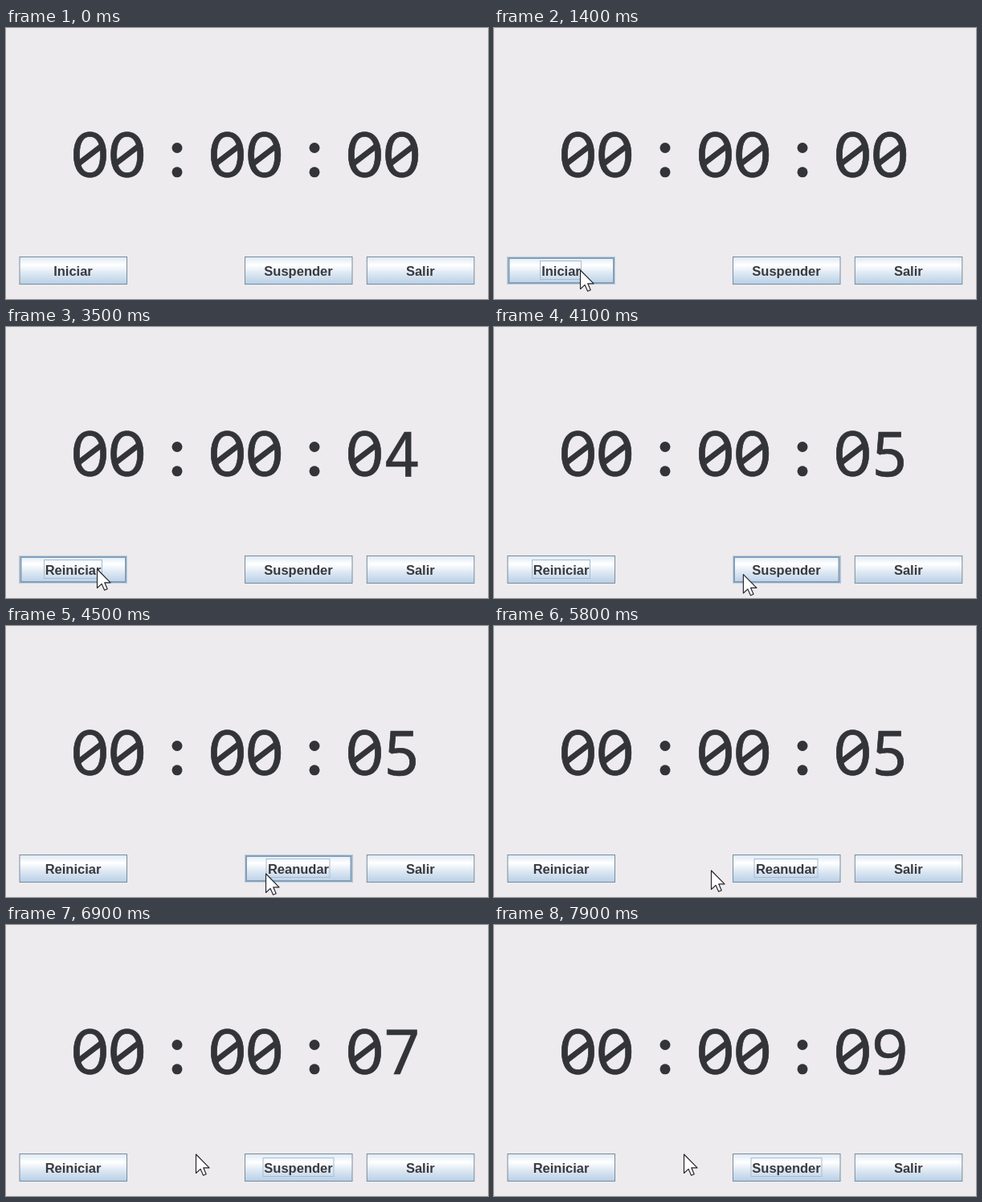
An HTML page that plays this animation: 600x338 px, repeating every 8000 ms.

```html
<!DOCTYPE html>
<html lang="es">
<head>
<meta charset="utf-8">
<title>Cronómetro</title>
<style>
  html, body { margin: 0; width: 100%; height: 100%; overflow: hidden; background: #edebed; }
  svg { display: block; width: 600px; height: 338px; }
  .digit { font: 77.5px "Noto Sans Mono", monospace; text-anchor: middle; fill: #333438; stroke: #333438; stroke-width: .7; }
  .zero { font-family: Lato, sans-serif; }
  .slash { stroke: #333438; stroke-width: 7; }
  .label { font: bold 16.5px "Liberation Sans", Arial, sans-serif; text-anchor: middle; fill: #3a393d; }
  .edge { fill: url(#metal); stroke: #788d9f; }
  .glow { fill: none; stroke: #829fba; stroke-width: 2; }
  .rim { fill: none; stroke: #c3d0dc; }
  .focus { fill: none; stroke: #a5bdd4; }
</style>
</head>
<body>
<svg viewBox="0 0 600 338">
  <defs>
    <linearGradient id="metal" x2="0" y2="1">
      <stop stop-color="#dde8f3"/>
      <stop offset=".3" stop-color="#fff"/>
      <stop offset=".6" stop-color="#dde8f3"/>
      <stop offset="1" stop-color="#b8cfe5"/>
    </linearGradient>
  </defs>
  <rect width="600" height="338" fill="#edebed"/>
  <g id="clock"></g>
  <g id="buttons"></g>
  <path id="cursor" d="M0 0V17L4 13.3L6.6 19L9.2 17.9L6.7 12.2H12Z"
        fill="#fff" stroke="#25262b" stroke-width=".85" stroke-linejoin="round"/>
</svg>
<script>
const LOOP = 8000, TICK = 490;
const FOCUS = 100, START = 1500, PAUSE = 4300, RESUME = 6260;
const byId = id => document.getElementById(id);
const clamp = (v, low, high) => Math.min(high, Math.max(low, v));
const show = (node, on) => node.setAttribute("visibility", on ? "visible" : "hidden");

function add(parent, tag, attrs) {
  const node = document.createElementNS("http://www.w3.org/2000/svg", tag);
  for (const key in attrs) node.setAttribute(key, attrs[key]);
  return parent.appendChild(node);
}

const moves = [
  { from: 1000, to: 1350, x: 107, y: 302 },
  { from: 1600, to: 2050, x: 113, y: 302 },
  { from: 3550, to: 4200, x: 323, y: 309 },
  { from: 5050, to: 5300, x: 270, y: 305 },
  { from: 5800, to: 6050, x: 312, y: 303 },
  { from: 6300, to: 6700, x: 236, y: 286 }
];

function pointerAt(t) {
  let x = 124, y = 345;
  for (const move of moves) {
    const p = clamp((t - move.from) / (move.to - move.from), 0, 1);
    const ease = p * p * (3 - 2 * p);
    x += (move.x - x) * ease;
    y += (move.y - y) * ease;
  }
  return { x, y };
}

function makeDigit(x) {
  const text = add(byId("clock"), "text", { class: "digit", x, y: 185.5 });
  const slash = add(byId("clock"), "path", { class: "slash", d: `M${x - 14} 169L${x + 14} 147.5` });
  return value => {
    text.textContent = value;
    text.classList.toggle("zero", value === "0");
    show(slash, value === "0");
  };
}

const digits = [];
for (let pair = 0; pair < 3; pair++) {
  const x = 104.5 + pair * 171;
  digits.push(makeDigit(x), makeDigit(x + 46.3));
  if (pair < 2)
    for (const cy of [149.5, 179.8])
      add(byId("clock"), "circle", { cx: x + 108.5, cy, r: 6.5, fill: "#333438" });
}

function drawClock(t) {
  const running = clamp(t, START, PAUSE) - START + Math.max(0, t - RESUME);
  const seconds = Math.floor(running / TICK);
  const parts = [seconds / 3600, seconds / 60 % 60, seconds % 60];
  const text = parts.map(n => String(Math.floor(n)).padStart(2, "0")).join("");
  digits.forEach((setDigit, i) => setDigit(text[i]));
}

function makeButton(x, textAt, hasFocus) {
  const group = add(byId("buttons"), "g", { transform: `translate(${x} 285)` });
  const frame = (name, inset) => add(group, "rect", {
    class: name, x: inset, y: inset, width: 134.5 - 2 * inset, height: 35 - 2 * inset
  });
  frame("edge", 0.5);
  const rim = frame("rim", 0.5);
  const glow = frame("glow", 2);
  const focus = add(group, "rect", { class: "focus", y: 5.5, height: 23 });
  const label = add(group, "text", { class: "label", x: 67, y: 23.5 });

  return (t, tip) => {
    label.textContent = textAt(t);
    const width = Math.ceil(label.getComputedTextLength() + 2);
    focus.setAttribute("width", width);
    focus.setAttribute("x", Math.floor(67 - width / 2));
    const hover = tip.x >= x && tip.x <= x + 135 && tip.y >= 285 && tip.y <= 320;
    show(rim, hover);
    show(glow, hover);
    show(focus, hasFocus(t));
  };
}

const buttons = [
  makeButton(16.5, t => t < START ? "Iniciar" : "Reiniciar", t => t >= FOCUS && t < PAUSE),
  makeButton(297, t => t >= PAUSE && t < RESUME ? "Reanudar" : "Suspender", t => t >= PAUSE),
  makeButton(448.8, () => "Salir", () => false)
];

function draw() {
  const t = performance.now() % LOOP;
  const tip = pointerAt(t);
  drawClock(t);
  buttons.forEach(drawButton => drawButton(t, tip));
  byId("cursor").setAttribute("transform", `translate(${tip.x + 0.5} ${tip.y}) scale(1.38)`);
  requestAnimationFrame(draw);
}
draw();
</script>
</body>
</html>
```
